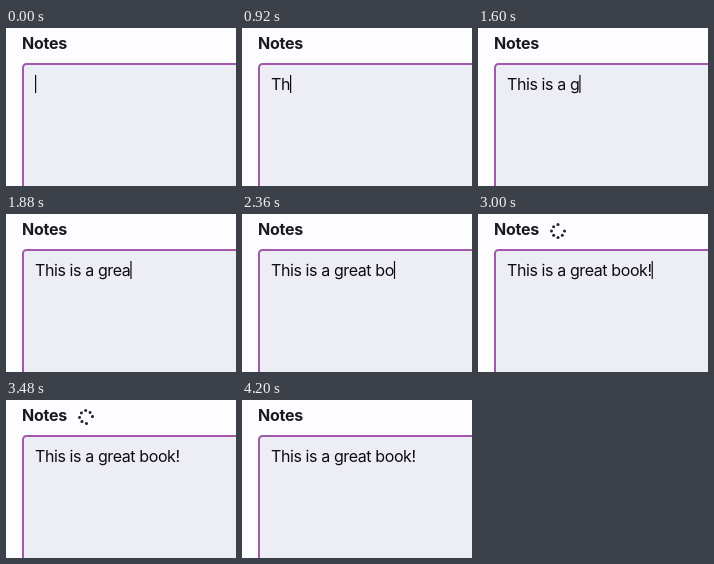
These frames come from a looping animation (230 by 158 pixels, 4320 ms). An HTML page:

```html
<!DOCTYPE html>
<html lang="en">
<head>
<meta charset="utf-8">
<title>Notes</title>
<style>
  html, body { margin: 0; width: 100%; height: 100%; overflow: hidden; background: #fdfcfe; }
  svg { display: block; width: 230px; height: 158px; }
  text { font-family: Inter, "Liberation Sans", sans-serif; font-size: 16px; white-space: pre; }
  .label { font-weight: 700; letter-spacing: -0.25px; fill: #1b1a1e; }
  .note { letter-spacing: -0.4px; fill: #0c0c0f; }
</style>
</head>
<body>
<svg viewBox="0 0 230 158">
  <rect width="230" height="158" fill="#fdfcfe"/>
  <text class="label" x="16" y="21">Notes</text>
  <g id="spinner" fill="#222126"></g>
  <rect x="17" y="36" width="260" height="180" rx="3.5" fill="#ecedf5" stroke="#a259ab" stroke-width="2"/>
  <text id="note" class="note" x="29" y="62"></text>
  <rect id="caret" y="47" width="1.2" height="18" fill="#0c0c0f"/>
</svg>
<script>
  const LOOP = 4320, TICK = 40, LEFT = 29;
  const MESSAGE = "This is a great book!";
  // Time at which each character is typed
  const KEYS = [
    800, 920, 960, 1040, 1120, 1200, 1280, 1320,
    1400, 1480, 1600, 1680, 1760, 1880,
    1960, 2080, 2160, 2280, 2400, 2480, 2720
  ];
  const CARET_OFF = [[120, 600], [3240, 3720], [4200, LOOP]];
  const SAVING = [3000, 3640], TURN = 2000;

  const note = document.getElementById("note");
  const caret = document.getElementById("caret");
  const spinner = document.getElementById("spinner");
  const within = (t, [from, to]) => t >= from && t < to;

  // Seven dots on a ring, with the top right place left empty
  for (let i = 0; i < 8; i++) {
    if (i === 1) continue;
    const a = i * Math.PI / 4, r = i % 2 ? 6.14 : 6.5;
    const dot = document.createElementNS("http://www.w3.org/2000/svg", "circle");
    dot.setAttribute("cx", r * Math.sin(a));
    dot.setAttribute("cy", -r * Math.cos(a));
    dot.setAttribute("r", 1.5);
    spinner.append(dot);
  }

  note.textContent = MESSAGE;
  const stops = [LEFT];
  for (let i = 0; i < MESSAGE.length; i++) stops.push(note.getEndPositionOfChar(i).x);

  function draw(time) {
    const t = Math.floor((time % LOOP) / TICK) * TICK;
    const count = KEYS.filter(k => k <= t).length;
    const text = MESSAGE.slice(0, count);
    if (note.textContent !== text) note.textContent = text;

    caret.setAttribute("x", stops[count]);
    caret.style.display = CARET_OFF.some(span => within(t, span)) ? "none" : "";

    const angle = (t - SAVING[0]) / TURN * 360;
    spinner.setAttribute("transform", `translate(80 17) rotate(${angle})`);
    spinner.style.display = within(t, SAVING) ? "" : "none";
  }

  const start = performance.now();
  function frame() {
    draw(performance.now() - start);
    requestAnimationFrame(frame);
  }
  frame();
</script>
</body>
</html>
```
